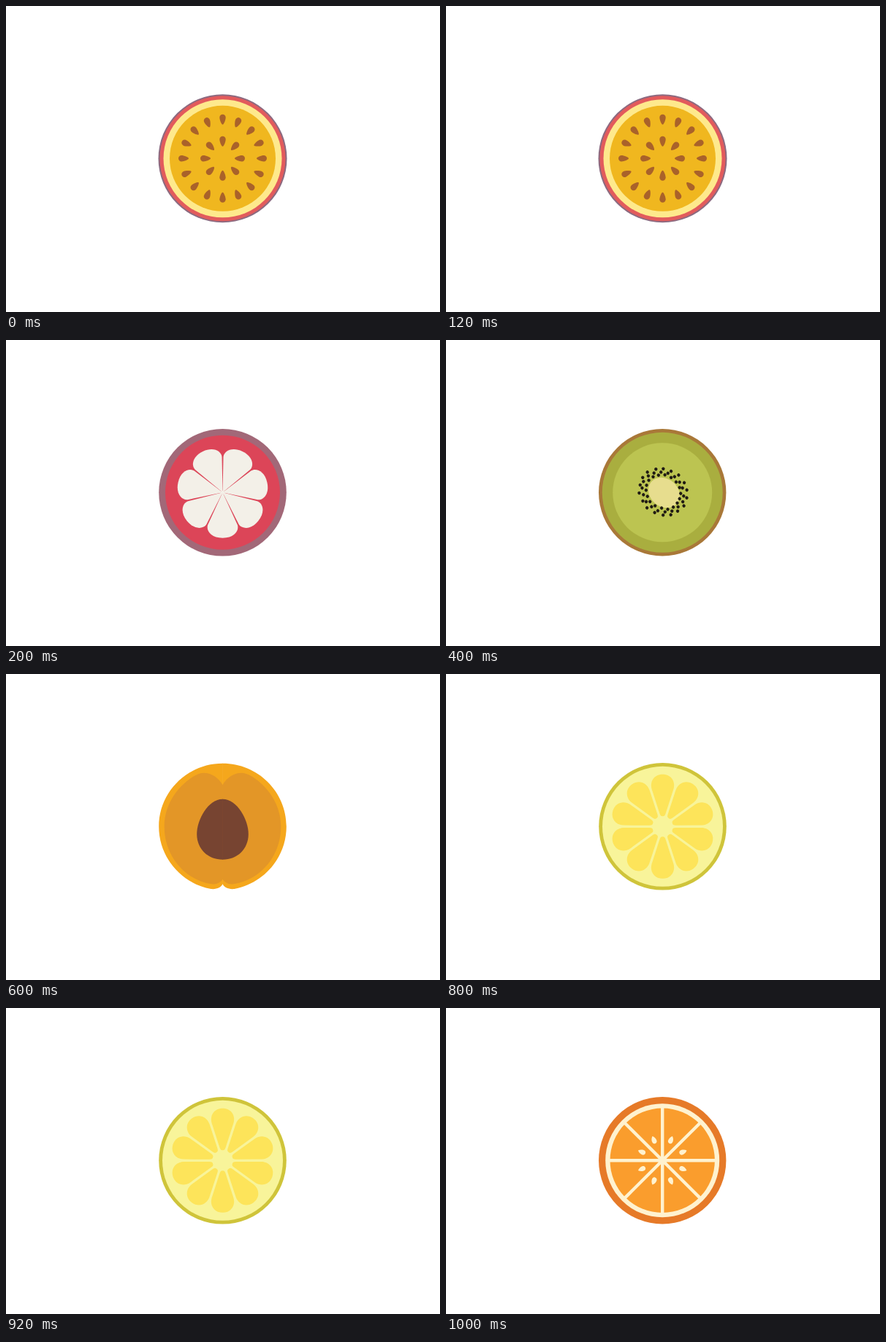
Write an HTML page that moves like this. It is 594x420 px and loops after 1200 ms.

```html
<!DOCTYPE html>
<html lang="en">
<head>
<meta charset="utf-8">
<title>Fruit slices</title>
<style>
html, body { margin: 0; width: 100%; height: 100%; overflow: hidden; background: #fff; }
svg { display: block; width: 100%; height: 100%; }
</style>
</head>
<body>
<svg id="stage" viewBox="0 0 594 420"></svg>
<script>
const STEP = 200;

const disc = (r, fill) => `<circle r="${r}" fill="${fill}"/>`;
const path = (d, fill) => `<path d="${d}" fill="${fill}"/>`;
const repeat = (n, make) => Array.from({ length: n }, (_, i) => make(i)).join('');

// Repeats a shape n times around the centre.
const ring = (n, shape, start = 0) =>
  repeat(n, i => `<g transform="rotate(${start + i * 360 / n})">${shape}</g>`);

// Draws a half outline together with its mirror image.
const mirrored = (d, fill) => path(d, fill) + `<g transform="scale(-1 1)">${path(d, fill)}</g>`;

// Teardrop above the centre, tip pointing inward.
const drop = (tip, fill) => path(
  `M0 ${-tip} C-1.6 ${-tip} -4.2 ${-tip - 6.5} -4.2 ${-tip - 9.8}
   A4.2 4.2 0 0 1 4.2 ${-tip - 9.8} C4.2 ${-tip - 6.5} 1.6 ${-tip} 0 ${-tip}Z`, fill);

// Seeded random numbers between -1 and 1.
function jitter(seed) {
  return () => {
    seed = (seed * 16807) % 2147483647;
    return seed / 1073741823.5 - 1;
  };
}

function passionFruit() {
  const seed = '#a9622a';
  return disc(88, '#8c6a80') + disc(86, '#e25b5c') + disc(81, '#fee98c') + disc(72.5, '#f0b71f')
    + ring(16, drop(46.5, seed)) + ring(8, drop(16.5, seed));
}

function mangosteen() {
  const flesh = '#f3f0e8';
  const lobe = path('M0 0 L20.3 44.5 C23 52 16 62.5 0 62.5 C-16 62.5 -23 52 -20.3 44.5Z', flesh);
  return disc(87.3, '#a26878') + disc(78.5, '#dc4558') + ring(7, lobe) + disc(2.5, flesh);
}

function kiwi() {
  const rows = 3, spokes = 18;
  const rand = jitter(77);
  // Slanted rows around the core, each seed nudged a little.
  const seeds = repeat(rows * spokes, i => {
    const row = i % rows;
    const angle = 2 * Math.PI * i / (rows * spokes);
    const x = (25.5 + 4.2 * row) * Math.cos(angle) + 0.8 * rand();
    const y = (22 + 4.2 * row) * Math.sin(angle) + 0.8 * rand();
    return `<circle cx="${x}" cy="${y}" r="2.2" fill="#211c14"/>`;
  });
  return disc(87.2, '#a97838') + disc(82.5, '#a9ae3f') + disc(68, '#bcc451')
    + '<ellipse rx="23" ry="19" transform="translate(2.3 .3) rotate(40)" fill="#e7dd8e"/>'
    + `<g transform="translate(1 -1) rotate(40)">${seeds}</g>`;
}

function apricot() {
  return mirrored('M-.3 -86.5 H0 C48 -86.5 87.3 -48 87.3 0 C87.3 42 57 78 16 85.7 C8 86.5 2 83.5 0 79 H-.3Z', '#f5a71c')
    + mirrored('M-.3 -57 H0 C6 -68 17 -74 27 -73.5 C40 -73 79.8 -45 79.8 0 C79.8 42 50 74 15 79 C8 80 3 77 0 72.5 H-.3Z', '#e39627')
    + mirrored('M-.3 -37.5 H0 C20 -37.5 35.3 -9 35.3 10.5 C35.3 31 20 45.5 0 45.5 H-.3Z', '#774431');
}

function lemon() {
  const wedge = path(`M0 -14 C2.5 -14 3 -15 4 -17.5 L14.8 -51 C18 -61 12 -71.5 0 -71.5
    C-12 -71.5 -18 -61 -14.8 -51 L-4 -17.5 C-3 -15 -2.5 -14 0 -14Z`, '#fde45a');
  return disc(87.3, '#cfc43a') + disc(82.5, '#f8f49a') + ring(10, wedge);
}

function orange() {
  const pith = '#fff2cf';
  const spoke = path('M-2.2 0 V-73 H2.2 V0Z', pith);
  const seed = path('M0 -36 C4 -32.5 4.8 -25.3 0 -25.3 C-4.8 -25.3 -4 -32.5 0 -36Z', pith);
  return disc(87.2, '#e67a28') + disc(78, pith) + disc(71.7, '#fa9d2d')
    + ring(8, spoke) + disc(6, pith) + ring(8, seed, 22.5);
}

const stage = document.getElementById('stage');
const place = (art, x = 296.5) => `<g transform="translate(${x} 209.3)">${art}</g>`;
stage.innerHTML = [
  place(passionFruit()), place(mangosteen()), place(kiwi(), 296.2),
  place(apricot()), place(lemon()), place(orange(), 296.2)
].join('');
const slices = [...stage.children];

function draw(time) {
  const current = Math.floor(time / STEP) % slices.length;
  slices.forEach((slice, i) => { slice.style.display = i === current ? '' : 'none'; });
}

const start = performance.now();
function tick() {
  draw(performance.now() - start);
  requestAnimationFrame(tick);
}
draw(0);
requestAnimationFrame(tick);
</script>
</body>
</html>
```
